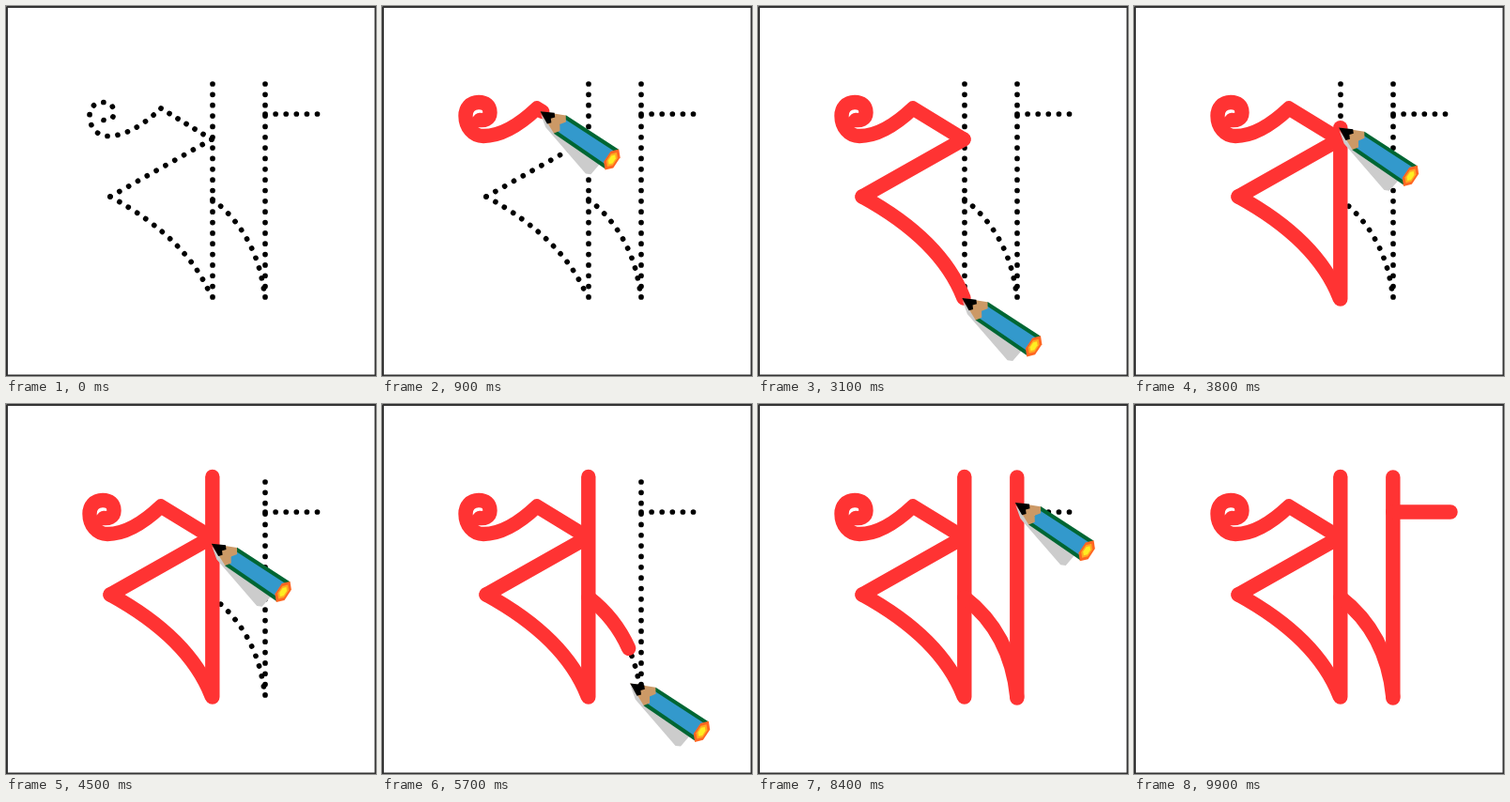
Write an HTML page with a canvas that moves like this. It is 394x394 px and loops after 10000 ms.

```html
<!DOCTYPE html>
<html>
<head>
<meta charset="utf-8">
<style>
html, body { margin: 0; width: 100%; height: 100%; overflow: hidden; background: #fff; }
canvas { display: block; }
</style>
</head>
<body>
<canvas id="stage" width="394" height="394"></canvas>
<script>
const ctx = document.getElementById('stage').getContext('2d');
const LOOP = 10000, STEP = 100;
const LEAN = 33.6 * Math.PI / 180, TURN = 44 * Math.PI / 180;

const CURL = 'M104 121.5C108 122 115 121 115 113.5C115 106 110 102.5 103 102.5' +
  'C94 102.5 89 109 89 117C89 129 97 138.5 108 138.5C128 138.5 147 126 165 109';
const ROOF = 'L219 142';
const SLANT = 'M219 142L111 203';
const BOW = 'M111 203Q195 249 219 311';
const ARC = 'M220 206Q269 244 275.8 312';
const BAR = 'M275.8 115H337';

function makePath(d) {
  const el = document.createElementNS('http://www.w3.org/2000/svg', 'path');
  el.setAttribute('d', d);
  const len = el.getTotalLength();
  return { shape: new Path2D(d), len, at: k => el.getPointAtLength(k * len) };
}

const guides = [CURL, 'M165 109' + ROOF, SLANT, BOW, 'M220 83V310', ARC,
  'M276 83V310', 'M276 115H331.5'].map(makePath);

// a timed path; the power eases its progress
function move(t0, t1, d, power = 1) {
  const path = makePath(d);
  const progress = t => Math.pow(Math.max(0, Math.min(1, (t - t0) / (t1 - t0))), power);
  return { t0, path, progress };
}

const shared = [
  move(0, 1220, CURL + ROOF),
  move(1220, 2250, SLANT),
  move(2250, 3100, BOW),
  move(3100, 4000, 'M219.8 312V77.5')
];
const bar = move(8480, 9800, BAR, .78);

const strokes = [...shared,
  move(5000, 6000, ARC, 1.6),
  move(6700, 7900, 'M275.8 313V78', .93),
  bar];

// the pencil drifts apart from the ink on the right half
const legs = [...shared,
  move(4000, 4900, 'M220.5 77V206'),
  move(4900, 5870, 'M220.5 206L275.5 317'),
  move(6700, 8185, 'M275.5 317V78', .93),
  move(8185, 8480, 'M275.5 78V115'),
  bar];

function drawGuides() {
  ctx.strokeStyle = '#000';
  ctx.lineWidth = 5.7;
  for (const { shape, len } of guides) {
    const gap = len / Math.round(len / 11.1);
    ctx.setLineDash([.01, gap - .012]);
    ctx.stroke(shape);
  }
  ctx.setLineDash([]);
}

function drawStrokes(t) {
  ctx.strokeStyle = '#ff3333';
  ctx.lineWidth = 15.4;
  for (const { path, progress } of strokes) {
    const k = progress(t);
    if (k === 0) continue;
    ctx.setLineDash(k < 1 ? [path.len * k, path.len + 50] : []);
    ctx.stroke(path.shape);
  }
  ctx.setLineDash([]);
}

function poly(color, points) {
  ctx.fillStyle = color;
  ctx.beginPath();
  for (const [x, y] of points) ctx.lineTo(x, y);
  ctx.closePath();
  ctx.fill();
}

// cone from the tip with a zigzag base
function cone(color, length, half, notch) {
  const base = [0, 1, 2, 3, 4].map(i => [length + i % 2 * notch, half * (i / 2 - 1)]);
  poly(color, [[0, 0], ...base]);
}

function hexagon(color, size) {
  const corners = [0, 1, 2, 3, 4, 5].map(i => {
    const a = (i + .5) * Math.PI / 3;
    return [92 + 7 * size * Math.cos(a), .5 + 13.3 * size * Math.sin(a)];
  });
  poly(color, corners);
}

function band(color, half) {
  poly(color, [[25, -half], [92, -half - .7], [92, half + 1], [25, half]]);
}

function drawPencil(t) {
  if (t <= 0 || t >= 9900) return;
  const leg = legs.filter(l => l.t0 < t).pop();
  const tip = leg.path.at(leg.progress(t));
  ctx.save();
  ctx.translate(tip.x - 1.7, tip.y);
  ctx.rotate(LEAN + TURN * bar.progress(t));
  poly('#ccc', [[2, 2], [14, 11], [77, 28.5], [82, 26], [84, 10], [25, 10]]);
  band('#006633', 11.7);
  band('#3399cc', 7.6);
  cone('#cc9966', 25, 11.5, 4);
  cone('#000', 13.5, 7, 3);
  hexagon('#ff6622', 1);
  hexagon('#ffaa22', .68);
  hexagon('#ffee22', .45);
  ctx.restore();
}

function draw(t) {
  ctx.fillStyle = '#fff';
  ctx.fillRect(0, 0, 394, 394);
  ctx.lineCap = ctx.lineJoin = 'round';
  drawGuides();
  drawStrokes(t);
  drawPencil(t);
  ctx.strokeStyle = '#333';
  ctx.lineWidth = 2;
  ctx.strokeRect(1, 1, 392.5, 392.5);
}

const start = performance.now();
function tick() {
  const t = (performance.now() - start) % LOOP;
  draw(Math.floor(t / STEP) * STEP);
  requestAnimationFrame(tick);
}
tick();
</script>
</body>
</html>
```
